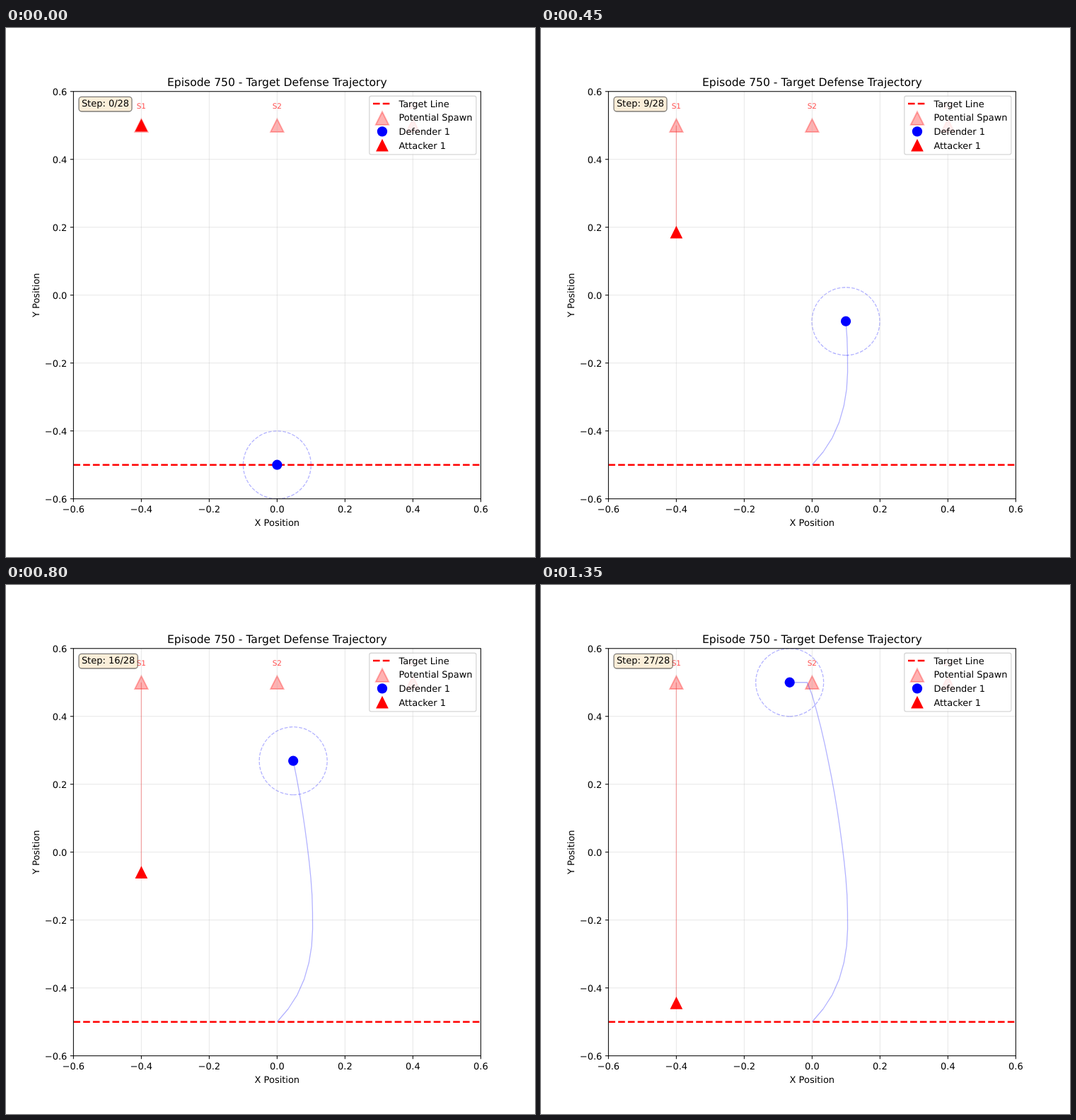
These frames come from a looping animation (748 by 748 pixels, 1400 ms). An HTML page:

```html
<!DOCTYPE html>
<html lang="en">
<head>
<meta charset="utf-8">
<title>Target Defense Trajectory</title>
<style>
  html, body { margin: 0; width: 100%; height: 100%; overflow: hidden; background: #fff; }
  svg { display: block; width: 748px; height: 748px; }
  text { font-family: "DejaVu Sans", sans-serif; white-space: pre; text-rendering: geometricPrecision; }
</style>
</head>
<body>
<svg id="stage" viewBox="0 0 748 748"></svg>
<script>
const PT = 748 / 576;            // one point in pixels
const FONT = 10 * PT;
const LEFT = 95.37, TOP = 89.76, SIZE = 575.96, UNIT = SIZE / 1.2;
const RIGHT = LEFT + SIZE, BOTTOM = TOP + SIZE;
const STEPS = 28, STEP_MS = 50;
const px = x => LEFT + (x + 0.6) * UNIT;
const py = y => TOP + (0.6 - y) * UNIT;
const stage = document.getElementById("stage");

function add(tag, attrs, parent = stage) {
  const el = document.createElementNS("http://www.w3.org/2000/svg", tag);
  for (const k in attrs) el.setAttribute(k, attrs[k]);
  parent.appendChild(el);
  return el;
}

function label(str, x, y, attrs = {}) {
  const el = add("text", { x, y, "font-size": FONT, ...attrs });
  el.textContent = str;
  return el;
}

function line(x1, y1, x2, y2, stroke, width, attrs = {}) {
  return add("line", { x1, y1, x2, y2, stroke, "stroke-width": width * PT, ...attrs });
}

function triangle(x, y, size, edge, opacity = 1) {
  const h = size * PT / 2;
  return add("path", {
    d: `M0 ${-h}L${-h} ${h}H${h}Z`, transform: `translate(${x} ${y})`,
    fill: "red", stroke: "red", "stroke-width": edge * PT,
    "fill-opacity": opacity, "stroke-opacity": opacity
  });
}

const spawn = (x, y) => triangle(x, y, Math.sqrt(200), 1.5, 0.3);
const attackerMark = (x, y) => triangle(x, y, 12, 1);
const defenderMark = (cx, cy) => add("circle", { cx, cy, r: 5.5 * PT, fill: "blue" });
const dashes = width => `${3.7 * width * PT} ${1.6 * width * PT}`;

// Defender path: constant speed, sideways drift per step, stopped by the upper bound
const drift = [15.6, 13, 9.7, 6.6, 3.9, 1.4, -0.1, -0.7, -1.7, -2.4, -2.9, -3.2, -3.5, -3.9,
  -4.3, -4.7, -4.9, -5.4, -6, -6.5, -7, -6.6, -5.9, -4.6, -3.4, -2.4, -1.8];
const speed = 0.05 * UNIT;
const path = [[px(0), py(-0.5)]];
for (const dx of drift) {
  const [x, y] = path[path.length - 1];
  path.push([x + dx, Math.max(py(0.5), y - Math.sqrt(speed * speed - dx * dx))]);
}

// Plot area
const clip = add("clipPath", { id: "area" });
add("rect", { x: LEFT, y: TOP, width: SIZE, height: SIZE }, clip);
const inside = { "clip-path": "url(#area)" };

const rangeGroup = add("g", inside);
const range = add("path", {
  fill: "none", stroke: "blue", "stroke-opacity": 0.3,
  "stroke-width": PT, "stroke-dasharray": dashes(1)
}, rangeGroup);

const spawnXs = [-0.4, 0, 0.4];
spawnXs.forEach(x => spawn(px(x), py(0.5)));

const ticks = [-0.6, -0.4, -0.2, 0, 0.2, 0.4, 0.6];
for (const v of ticks) {
  const x = px(v), y = py(v), name = v.toFixed(1).replace("-", "\u2212");
  if (Math.abs(v) < 0.6) {
    line(x, TOP, x, BOTTOM, "#b0b0b0", 0.8, { "stroke-opacity": 0.3 });
    line(LEFT, y, RIGHT, y, "#b0b0b0", 0.8, { "stroke-opacity": 0.3 });
  }
  line(x, BOTTOM, x, BOTTOM + 3.5 * PT, "#000", 0.8);
  line(LEFT - 3.5 * PT, y, LEFT, y, "#000", 0.8);
  label(name, x, 684.7, { "text-anchor": "middle" });
  label(name, LEFT - 7 * PT, y + 4.8, { "text-anchor": "end" });
}

line(LEFT, py(-0.5), RIGHT, py(-0.5), "red", 2, { "stroke-dasharray": dashes(2) });

const trailStyle = { fill: "none", "stroke-width": PT, "stroke-opacity": 0.3, "stroke-linejoin": "round" };
const trail = add("polyline", { ...trailStyle, stroke: "blue" });
const defender = defenderMark(0, 0);
const fall = line(px(-0.4), py(0.5), px(-0.4), py(0.5), "red", 1, { "stroke-opacity": 0.3 });
const attacker = attackerMark(0, 0);

add("rect", {
  x: LEFT, y: TOP, width: SIZE, height: SIZE,
  fill: "none", stroke: "#000", "stroke-width": 0.8 * PT
});

// Titles and labels
const middle = { "text-anchor": "middle" };
label("Episode 750 - Target Defense Trajectory", px(0), 82, { ...middle, "font-size": 12 * PT });
label("X Position", px(0), 703.5, middle);
label("Y Position", 0, 0, { ...middle, transform: `translate(46.6 ${py(0)}) rotate(-90)` });
spawnXs.forEach((x, i) => label("S" + (i + 1), px(x), 113.8,
  { ...middle, "font-size": 8 * PT, fill: "red", "fill-opacity": 0.7 }));

// Step counter
const box = add("rect", {
  x: 103, y: 97.4, height: 20.6, rx: 3.9, fill: "wheat", "fill-opacity": 0.5,
  stroke: "#000", "stroke-opacity": 0.5, "stroke-width": PT
});
const counter = label("", 106.9, 111.4);

// Legend
add("rect", {
  x: 513.8, y: 96.25, width: 151.04, height: 82.7, rx: 2.6,
  fill: "#fff", "fill-opacity": 0.8, stroke: "#ccc", "stroke-opacity": 0.8, "stroke-width": PT
});
const rowY = i => 111.5 + 19.7 * i;
["Target Line", "Potential Spawn", "Defender 1", "Attacker 1"]
  .forEach((name, i) => label(name, 555.4, rowY(i)));
const keyX = 531.97;
line(keyX - FONT, rowY(0) - 4.5, keyX + FONT, rowY(0) - 4.5, "red", 2, { "stroke-dasharray": dashes(2) });
spawn(keyX, rowY(1) - 3.5);
defenderMark(keyX, rowY(2) - 4.5);
attackerMark(keyX, rowY(3) - 4.5);

function draw(step) {
  const [x, y] = path[step], r = 0.1 * UNIT;
  range.setAttribute("d", `M${x} ${y + r}A${r} ${r} 0 0 0 ${x} ${y - r}A${r} ${r} 0 0 0 ${x} ${y + r}Z`);
  trail.setAttribute("points", path.slice(0, step + 1).join(" "));
  defender.setAttribute("cx", x);
  defender.setAttribute("cy", y);
  const ay = py(0.5 - 0.035 * step);
  fall.setAttribute("y2", ay);
  attacker.setAttribute("transform", `translate(${px(-0.4)} ${ay})`);
  counter.textContent = `Step: ${step}/${STEPS}`;
  box.setAttribute("width", step < 10 ? 75 : 83.3);
}

function tick() {
  draw(Math.floor(performance.now() / STEP_MS) % STEPS);
  requestAnimationFrame(tick);
}
tick();
</script>
</body>
</html>
```
